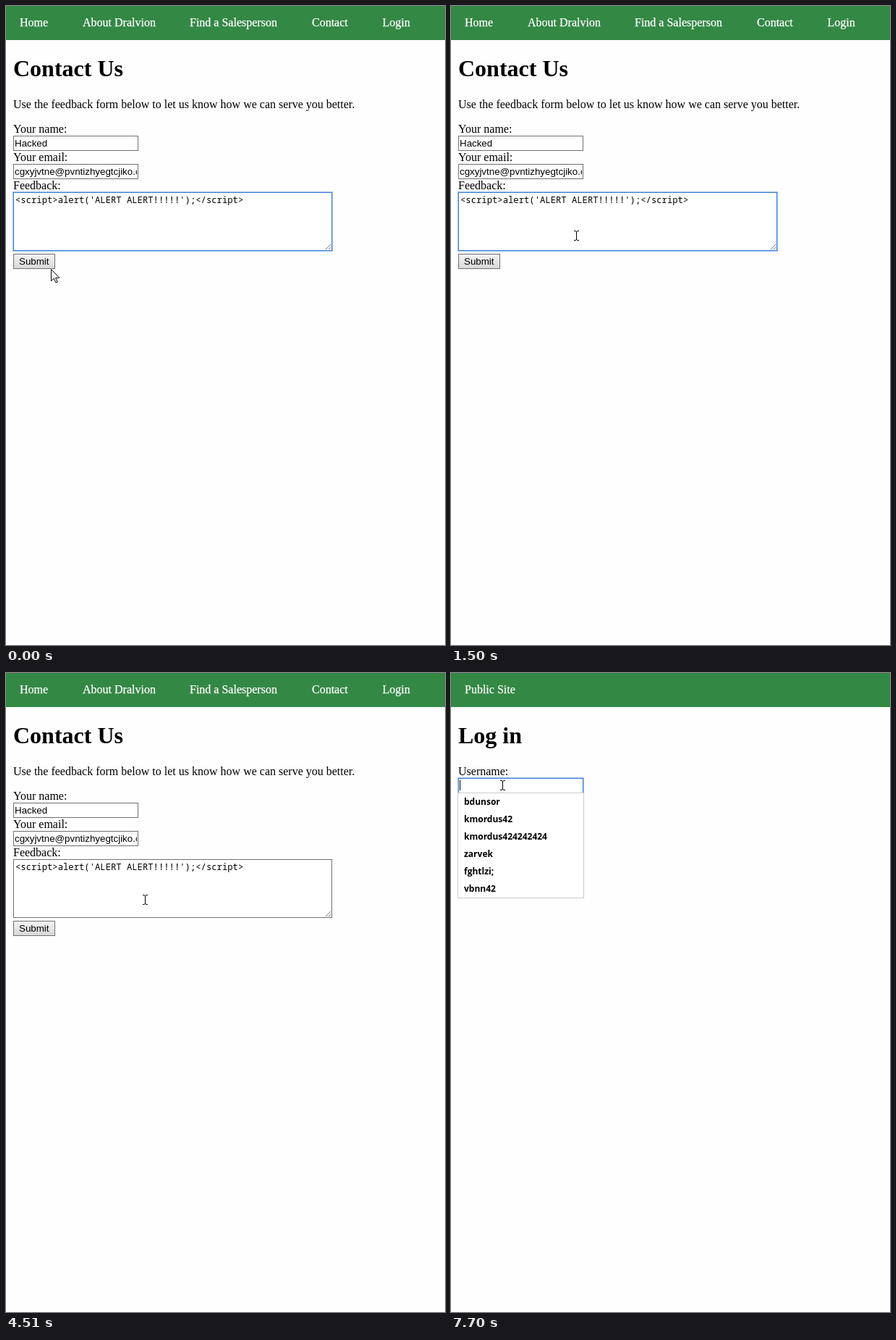
Recreate the animation shown at these times as an HTML page. Size 607 px wide and 882 px high, loop 8 s.

```html
<!DOCTYPE html>
<html lang="en">
<head>
<meta charset="utf-8">
<title>Feedback form</title>
<style>
  html, body { margin: 0; width: 100%; height: 100%; overflow: hidden; background: #fefefe; }
  svg { display: block; }
  text { font: 16px "Liberation Serif", serif; white-space: pre; }
  .nav { fill: #fff; stroke: #fff; stroke-width: .25; }
  .title { font-size: 32px; font-weight: bold; }
  .field { font: 13.333px "Liberation Sans", sans-serif; }
  .code { font: 12.22px "Noto Sans Mono", monospace; }
  .option { font: bold 12px "Open Sans", sans-serif; }
  .box { fill: #fff; stroke: #707070; }
  .box.focused { stroke: #3f7fd6; }
  .ring { display: none; fill: none; stroke: #9fc2ee; }
  .focused + .ring { display: inline; }
</style>
</head>
<body>
<svg width="607" height="882" viewBox="0 0 607 882">
  <defs>
    <linearGradient id="buttonFill" x2="0" y2="1">
      <stop stop-color="#f3f3f3"/><stop offset="1" stop-color="#d8d8d8"/>
    </linearGradient>
  </defs>
  <rect width="607" height="882" fill="#fefefe"/>
  <rect width="607" height="47" fill="#338844"/>

  <g id="siteNav" class="nav">
    <text x="19" y="28">Home</text>
    <text x="106" y="28">About Dralvion</text>
    <text x="254" y="28">Find a Salesperson</text>
    <text x="423" y="28">Contact</text>
    <text x="520.5" y="28">Login</text>
  </g>

  <g id="contact">
    <text class="title" x="10" y="97">Contact Us</text>
    <text x="10" y="141">Use the feedback form below to let us know how we can serve you better.</text>
    <text x="10" y="175">Your name:</text>
    <rect class="box" x="10.5" y="179.5" width="172" height="20"/>
    <text class="field" x="12" y="194">Hacked</text>
    <text x="10" y="214">Your email:</text>
    <rect class="box" x="10.5" y="218.5" width="172" height="20"/>
    <svg x="12" y="219" width="169" height="19">
      <text class="field" y="14">cgxyjvtne@pvntizhyegtcjiko.com</text>
    </svg>
    <text x="10" y="253">Feedback:</text>
    <rect id="feedback" class="box" x="10.5" y="257.5" width="440" height="80"/>
    <rect class="ring" x="9.5" y="256.5" width="442" height="82"/>
    <text class="code" x="13" y="272">&lt;script&gt;alert('ALERT ALERT!!!!!');&lt;/script&gt;</text>
    <path d="M442 336l7-7M446 336l3-3" stroke="#777"/>
    <rect x="10.5" y="342.5" width="57" height="20" fill="url(#buttonFill)" stroke="#707070"/>
    <text class="field" x="18" y="357">Submit</text>
  </g>

  <g id="received">
    <text class="title" x="10" y="97">Feedback Received</text>
    <text x="10" y="141">Thank you for submitting feedback. We hope to be able to use it to serve you</text>
    <text x="10" y="159">better.</text>
  </g>

  <g id="login">
    <text class="nav" x="19" y="28">Public Site</text>
    <text class="title" x="10" y="97">Log in</text>
    <text x="10" y="141">Username:</text>
    <rect id="username" class="box" x="10.5" y="145.5" width="172" height="20"/>
    <rect class="ring" x="9.5" y="144.5" width="174" height="22"/>
    <g id="suggestions">
      <path d="M12.5 148v14" stroke="#000"/>
      <rect x="9.5" y="165.5" width="174" height="145" fill="#fff" stroke="#ccc"/>
    </g>
  </g>

  <path id="arrow" d="M.5 .5V16.5L4.2 13L7 19L9.2 18L6.5 12.2H11.8Z" fill="#fff" stroke="#000"/>
  <path id="beam" d="M-3 -6.5H-1L.5 -5.5L2 -6.5H4M.5 -6V6M-3 6.5H-1L.5 5.5L2 6.5H4" fill="none" stroke="#000"/>
</svg>
<script>
const LOOP = 8000, STEP = 135, SLACK = 25;
const BLURRED = 1635, SUBMITTED = 5015, LOGIN_OPENED = 7115, FOCUSED = 7690;
const START = [62, 363];
const byId = id => document.getElementById(id);

// Each move carries the pointer on from where the last one ended
const moves = [
  { start: 250, end: 1240, through: [[49, 197], [150, 300]] },
  { start: 1360, end: 2340, through: [[195, 333], [187, 419]] },
  { start: 2920, end: 3330, through: [[499, 35]] },
  { start: 3610, end: 4640, through: [[512, 17], [529, 23], [300, 220], [106, 387]] },
  { start: 4760, end: 5450, through: [[50, 351], [236, 271], [213, 262]] },
  { start: 5730, end: 6680, through: [[561, 0], [312, 98]] },
  { start: 6830, end: 7700, through: [[540, 18], [200, 110], [71, 155]] }
];

["bdunsor", "kmordus42", "kmordus424242424", "zarvek", "fghtlzi;", "vbnn42"].forEach((name, i) => {
  const option = document.createElementNS("http://www.w3.org/2000/svg", "text");
  option.setAttribute("class", "option");
  option.setAttribute("x", 18);
  option.setAttribute("y", 182 + 24 * i);
  option.textContent = name;
  byId("suggestions").append(option);
});

function along(points, u) {
  const place = u * (points.length - 1);
  const i = Math.min(Math.floor(place), points.length - 2);
  return points[i].map((a, axis) => Math.round(a + (points[i + 1][axis] - a) * (place - i)));
}

// The pointer jumps in even steps during a move and rests between moves
function pointerAt(t) {
  let held = 0, point = START, origin = START;
  for (const { start, end, through } of moves) {
    if (t < start) break;
    const gaps = Math.round((end - start) / STEP);
    const gap = (end - start) / gaps;
    const k = Math.min(gaps, Math.floor((t - start + SLACK) / gap));
    held = start + k * gap;
    point = along([origin, ...through], (k + 1) / (gaps + 1));
    origin = through.at(-1);
  }
  return { held, point };
}

function isOver(box, [x, y]) {
  const { left, right, top, bottom } = box.getBoundingClientRect();
  return x > left && x < right && y > top && y < bottom;
}

const show = (id, on) => { byId(id).style.display = on ? "inline" : "none"; };

function draw(now) {
  const { held, point } = pointerAt(now % LOOP);
  const page = held < SUBMITTED ? "contact" : held < LOGIN_OPENED ? "received" : "login";
  for (const id of ["contact", "received", "login"]) show(id, id === page);
  show("siteNav", page !== "login");
  show("suggestions", held >= FOCUSED);
  byId("feedback").classList.toggle("focused", held < BLURRED);
  byId("username").classList.toggle("focused", held >= FOCUSED);

  const editing = [...document.querySelectorAll(".box")].some(box => isOver(box, point));
  show("arrow", !editing);
  show("beam", editing);
  byId(editing ? "beam" : "arrow").setAttribute("transform", `translate(${point})`);
  requestAnimationFrame(() => draw(performance.now()));
}
draw(0);
</script>
</body>
</html>
```
